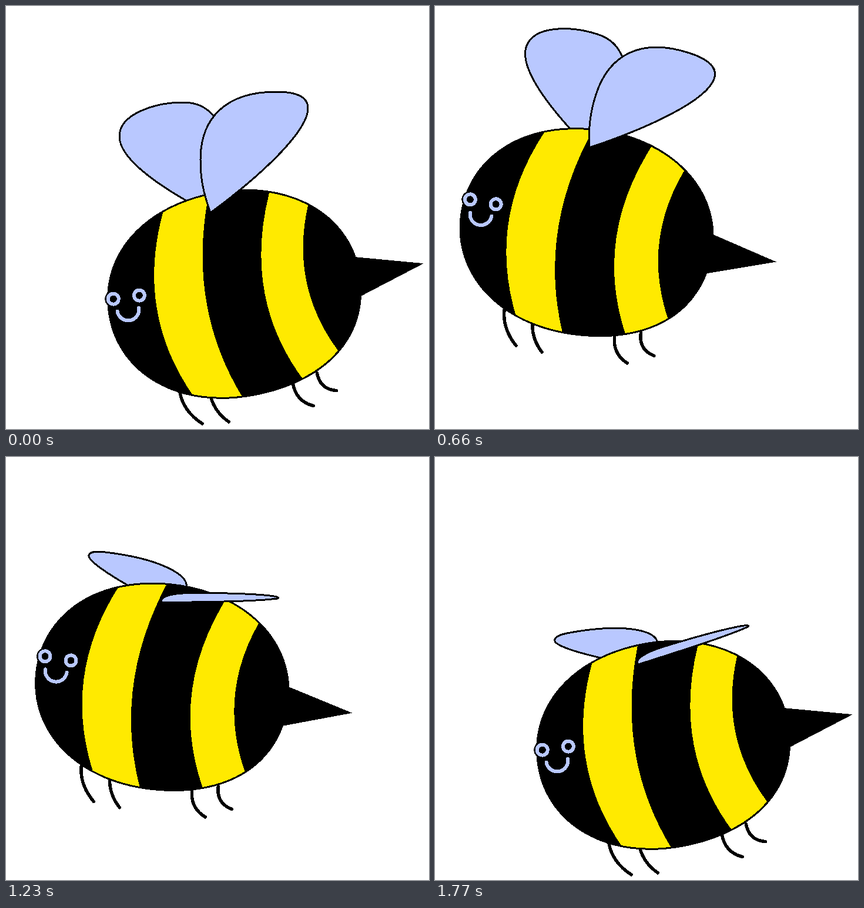
Recreate the animation shown at these times as an HTML page. Size 720x720 px, loop 1800 ms.

```html
<!DOCTYPE html>
<html lang="en">
<head>
<meta charset="utf-8">
<title>Bee</title>
<style>
  html, body { margin: 0; width: 100%; height: 100%; overflow: hidden; background: #fff; }
  svg { display: block; width: 100vw; height: 100vh; }
  .wing { fill: #b9c8ff; stroke: #000; stroke-width: 3; stroke-linejoin: round; }
  .line { fill: none; stroke: #000; stroke-width: 5.5; stroke-linecap: round; }
  .face { fill: #000; stroke: #b9c8ff; stroke-width: 6; stroke-linecap: round; }
</style>
</head>
<body>
<svg viewBox="0 0 720 720" shape-rendering="crispEdges">
  <defs>
    <path id="shape" d="M-215 0C-215-103-127-175 0-175C124-175 216-101 216 0C216 108 132 175 0 175C-125 175-215 101-215 0Z"/>
    <clipPath id="inside"><use href="#shape"/></clipPath>
  </defs>
  <g id="bee">
    <!-- far wing -->
    <g class="up" transform="rotate(10.3 1.5 0) translate(-388 -490)">
      <path class="wing" d="M345 352C260 308 193 260 193 222C193 183 255 164 302 164C325 164 342 173 354 188C375 215 365 300 345 352Z"/>
    </g>
    <g class="down" transform="translate(-313.5 -430.5)">
      <path class="wing" d="M335 256C337 238 290 214 190 214C172 214 164 218 164 223C164 232 200 250 232 264L300 300Z"/>
    </g>

    <path class="line" d="M-120.5 148Q-120.5 181-92.5 207.5M-70 167Q-67 193-47.5 212.5M71.5 169Q72 199 99 211.5M115 157Q115 186 142.5 193"/>
    <path d="M190-32L327 6.5L190 49Z"/>
    <use href="#shape"/>
    <g clip-path="url(#inside)" fill="#ffea00">
      <path d="M-83.5-179.5L-91.5-163.5Q-172 0-98.5 159.5L-91.5 175.5L-11.5 190.5L-17.5 174.5Q-82 6-12.5-173.5L-6.5-189.5Z"/>
      <path d="M95.5-171.5L88.5-155.5Q14 11 90.5 165.5L97.5 181.5L166.5 145.5L158.5 129.5Q95.5 4 151.5-127.5L158.5-143.5Z"/>
    </g>
    <use href="#shape" fill="none" stroke="#000" stroke-width="3"/>

    <circle cx="-203.5" cy="-28.5" r="14.5"/>
    <circle class="face" cx="-203.5" cy="-28.5" r="9"/>
    <circle class="face" cx="-159" cy="-26.5" r="9"/>
    <path class="face" d="M-200.5-6.5A18.5 18.5 0 0 0-163.5-5.5"/>

    <!-- near wing -->
    <g class="up" transform="rotate(10.3 1.5 0) translate(-388 -490)">
      <path class="wing" d="M348 352C336 318 331 295 331 262C331 190 375 146 460 146C497 146 514 156 514 174C514 214 432 290 348 352Z"/>
    </g>
    <g class="down" transform="translate(-313.5 -430.5)">
      <path class="wing" d="M297 288C290 278 313 270 345 266C395 260 450 255 480 255C492 255 496 257 491 258.5C450 268.5 380 277 297 288Z"/>
    </g>
  </g>
</svg>
<script>
const LOOP = 1800, STEP = 30;
const bee = document.getElementById('bee');
const up = document.querySelectorAll('.up'), down = document.querySelectorAll('.down');

// cubic-bezier(.42, 0, .58, 1)
function ease(x) {
  if (x >= 1) return 1;
  let lo = 0, hi = 1, s;
  for (let i = 0; i < 24; i++) {
    s = (lo + hi) / 2;
    const r = 1 - s;
    if (1.26 * s * r * r + 1.74 * s * s * r + s * s * s < x) lo = s; else hi = s;
  }
  return s * s * (3 - 2 * s);
}

// 0 = low and right, 1 = high and left
const flight = t => t < 967 ? ease(t / 935) : 1 - ease((t - 967) / 795);

const show = (parts, on) => parts.forEach(e => e.style.display = on ? '' : 'none');

function draw(time) {
  const step = Math.floor((time % LOOP + 0.5) / STEP) % (LOOP / STEP);
  const p = flight(step * STEP);
  bee.setAttribute('transform',
    `translate(${388 - 159 * p} ${490 - 127.8 * p}) rotate(${22 * p - 10.3} 1.5 0)`);
  show(up, step % 2 === 0);
  show(down, step % 2 === 1);
}

let start;
function tick(now) {
  start ??= now;
  draw(now - start);
  requestAnimationFrame(tick);
}
draw(0);
requestAnimationFrame(tick);
</script>
</body>
</html>
```
